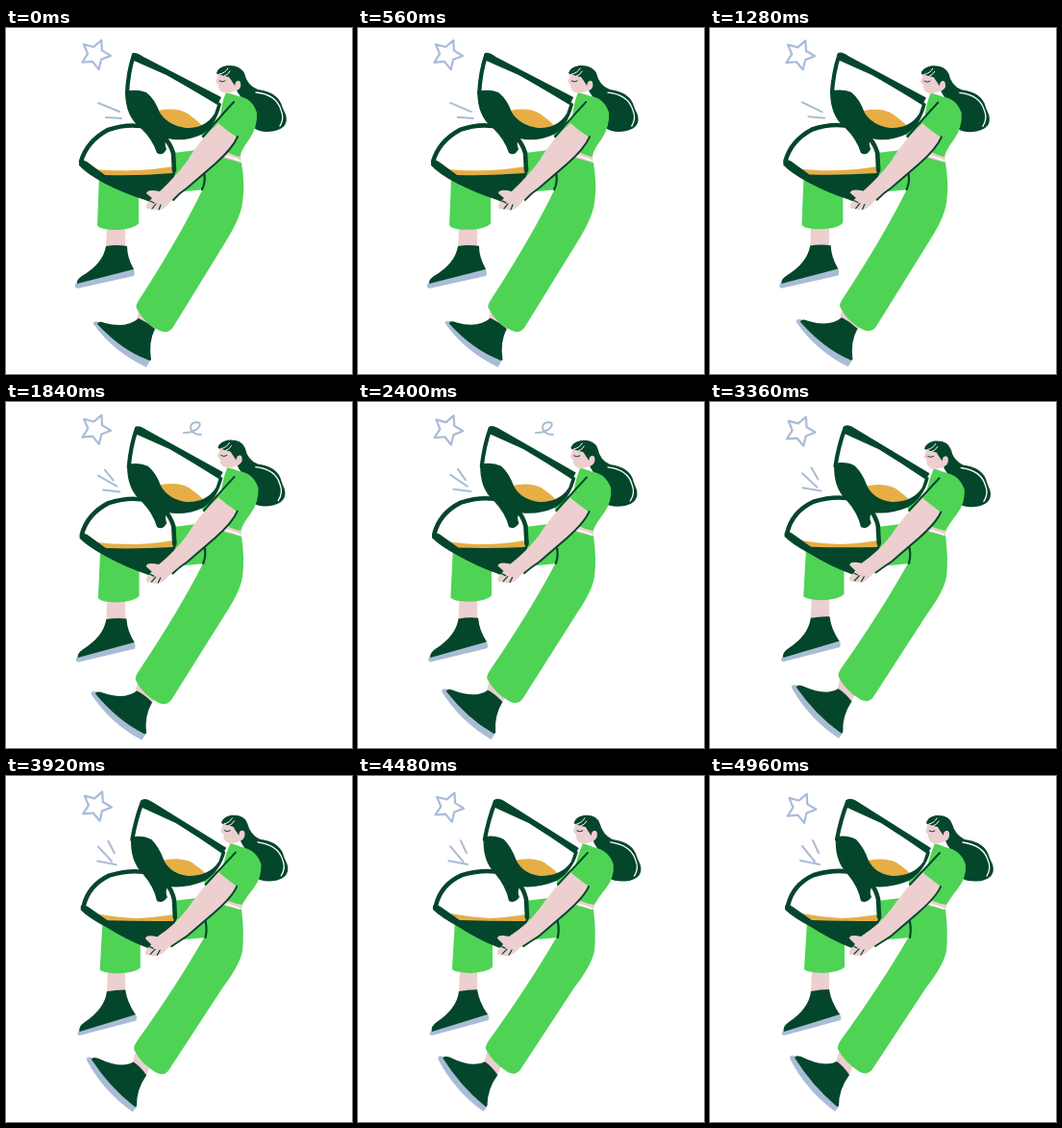
Recreate the animation shown at these times as an HTML page with a canvas. Size 360 by 360 pixels, loop 5.04 s.

```html
<!DOCTYPE html>
<html lang="en">
<head>
<meta charset="utf-8">
<title>Carrying the hourglass</title>
<style>
  html, body { margin: 0; width: 100%; height: 100%; overflow: hidden; background: #fff; }
  canvas { display: block; width: 100vmin; height: 100vmin; }
</style>
</head>
<body>
<canvas id="stage" width="360" height="360"></canvas>
<script>
const ctx = document.getElementById('stage').getContext('2d');
const LOOP = 5040, STEP = 80;
const GREEN = '#4fd355', DARK = '#04462c', SKIN = '#edcfd0', GOLD = '#e6ae44', BLUE = '#a9bcd6', WHITE = '#fff';

let ease = 0;
const mix = (a, b, k = ease) => a + (b - a) * k;

// "a>b" in path data is a coordinate that travels from a to b over the loop.
const shape = d => new Path2D(d.replace(/([\d.]+)>([\d.]+)/g, (_, a, b) => mix(+a, +b).toFixed(2)));

function fill(color, d) {
  ctx.fillStyle = color;
  ctx.fill(shape(d));
}

function line(color, width, d) {
  ctx.strokeStyle = color;
  ctx.lineWidth = width;
  ctx.stroke(shape(d));
}

function star(k) {
  const cx = mix(93, 94.5, k), cy = mix(27.5, 33.5, k);
  ctx.beginPath();
  for (let i = 0; i < 10; i++) {
    const r = i % 2 ? 8 : 16, a = i * Math.PI / 5 - 1.17;
    ctx.lineTo(cx + r * Math.cos(a), cy + r * Math.sin(a));
  }
  ctx.closePath();
  ctx.strokeStyle = BLUE;
  ctx.lineWidth = 2.2;
  ctx.stroke();
}

function accents(t) {
  star((t / LOOP) ** 2);
  line(BLUE, 2, 'M96>96 78>73 L118>109 87>89 M104>94 93>88 L120>114 94>92');
  if (t >= 1760) line(BLUE, 2, 'M101>107 72>67 L111>113 82>80');
  if (t >= 1840 && t < 2960) {
    line(BLUE, 2, 'M185 32 Q195 32 200 27 Q204 22 199 21 Q192 21 192 27 Q194 34 203 34');
  }
}

function backLeg() {
  fill(SKIN, 'M105>106 206>202 H124 V229>225 H104>105 Z');
  fill(BLUE, 'M73>76 265>265 L132>135 250>247 Q135>137 254>251 133>136 258>254 L74>77 271>270 Q70>73 270>269 73>76 265>265 Z');
  fill(DARK, 'M104>105 227>224 Q115 225>222 126>124 227>222 Q126>126 239>235 133>135 251>248 L74>77 266>266 Q73>75 262>261 79>82 258>256 Q101>103 245>242 104>105 227>224 Z');
  fill(GREEN, 'M97>101 153>151 Q130>134 134>132 174 130 L198 127 L230 140 L207>209 168 L176 171 L138>140 170 L138>140 203>199 Q134>135 209>204 115>117 210>205 Q97>100 210>204 95>98 205>201 Z');
}

function frontLeg() {
  fill(SKIN, 'M139>135 289>284 L160>149 303>300 L155>145 315>311 L136>131 303>298 Z');
  fill(BLUE, 'M91>83 306>292 Q95>86 304>289 99>90 307>293 Q118>109 332>326 150>134 346>344 L146>130 353>349 Q112>100 337>327 91>83 308>294 Z');
  fill(DARK, 'M138>132 302>297 Q147>139 306>302 155>145 313>311 Q148>134 327>326 151>134 345>343 Q150>133 347>345 147>131 345>343 Q120>106 335>322 95>88 308>293 Q96>89 304>290 103>95 307>292 Q125>119 313>304 138>132 302>297 Z');
  fill(GREEN, 'M226>227 134>134 L245 140>139 Q249>248 163 246>246 182 Q244>243 197 230>225 220 L174>169 311>305 Q169>164 319>312 160>156 315>308 Q144>140 308>298 136>133 292>284 Q134>132 289>281 139>136 282>275 Q181>178 217 205>207 167 L210 145 Z');
  line(DARK, 2.2, 'M205>207 148 Q209>210 158 204>208 168');
}

function lowerBulb() {
  fill(WHITE, 'M79>82 141>137 Q85>87 116>111 106>108 105>102 Q130>134 97>95 151>153 103>100 Q169>171 110>106 174>175 130>128 L176>177 148 L145 170 Z');
  fill(GOLD, 'M93>96 147>143 Q110>116 149>147 137 148 Q157 147 175>176 144 L172>174 154>151 L108>110 157>153 Z');
  fill(DARK, 'M76>78 140>135 Q78>80 136>132 84>86 139>136 L103>106 153>150 Q138 154>151 173>174 151 L177>178 144>142 Q177>178 156>155 167>168 168>167 L158 185>183 L145 179>178 Q125>125 173>170 103>105 162>157 Q83>86 151>147 76>78 143>139 Z');
  line(DARK, 4.6, 'M78>81 139>135 Q84>86 118>113 106>108 106>103 Q129>133 98>96 149>151 104>101 Q168>170 111>107 174>175 130>128 L175>176 148>147');
}

function upperBulb() {
  fill(WHITE, 'M135>145 28>27 L222>228 76>79 Q212>218 108>106 187>190 113>112 L126>132 68>66 Z');
  fill(GOLD, 'M158>163 86>88 Q177>181 82>84 189>194 89>90 Q199>203 96>96 207>211 104 L186>188 109 Q165>169 103 158>163 86>88 Z');
  fill(DARK, 'M124>131 66>63 Q136>144 63>61 146>152 67>66 Q155>160 74>74 160>165 88 Q168>172 101>102 187>190 104 Q207>212 105>104 217>222 89 L221>226 77 L224>229 79 Q218>224 103>98 203>207 111>109 Q186>187 119>117 168>169 115>115 Q164>165 119 167>168 126 Q163 134>133 157 130 Q152>154 115 140>143 104>102 Q124>129 92>88 124>131 66>63 Z');
  line(DARK, 4.2, 'M133>143 28>27 Q127>136 46>45 126>132 68>66');
  fill(DARK, 'M131>141 28>26 Q133>145 23>21 143>154 30>27 L224>230 72>75 L220>226 80>81 Q192>202 63>64 167>178 49 L133>143 34>33 Z');
}

function hair() {
  const sway = -10 * ease * (1 - ease);
  ctx.save();
  ctx.transform(1, 0, sway / 50, 1, -sway * 0.8, 0);
  fill(DARK, 'M219>225 47>49 Q220>226 41>43 230>235 39>41 Q243>249 38>40 248>252 47>50 Q251>255 60>61 262>265 64>66 Q280>283 66>68 286>289 78>80 Q288>291 84>86 291>294 90>92 Q295>298 103>105 280>283 107>109 Q266>269 110>111 258>261 104>106 Q263>265 93 255>259 82>84 Q244>248 74>77 239>244 63>65 Z');
  line(WHITE, 1.3, 'M260>263 67>69 Q281>284 69>72 286>289 85>87 Q290>293 94>96 285>288 102>104');
  ctx.restore();
}

function torso() {
  fill(SKIN, 'M227>229 126>128 L245>247 130>131 L244>245 140>139 Q235>237 137>137 226>228 135>135 Z');
  line(WHITE, 1.5, 'M228 133 Q236 135 243 138');
  fill(GREEN, 'M229>234 67>70 Q236>240 69>72 242>245 71>74 Q256>261 73>77 261>266 88>92 Q262>267 103>106 253>258 116>117 Q246>250 125>127 243>246 134 Q235 132 228 128 L207>210 116 Q201>205 112>113 204>208 106>107 L223>226 93>94 Q224>229 78>82 229>234 67>70 Z');
}

function face() {
  fill(SKIN, 'M221>227 46>48 Q221>226 51>53 218>224 56>58 L221>227 59>61 Q220>226 66>68 229>234 68>71 L237>242 66>69 Q246>250 64>67 244>249 57>59 Q243>247 53>55 239>244 56>58 L234>239 43>46 Z');
  fill(DARK, 'M219>225 47>49 Q224>229 38>40 234>239 40>42 Q246>250 43>46 244>249 55>57 Q239>243 53>55 238>243 60>62 Q235>239 55>57 232>237 51>53 Q226>231 50>52 219>225 47>49 Z');
  line(WHITE, 1, 'M222>228 48>50 Q228>233 47>49 231>236 42>44 M227>232 50>52 Q231>236 49>51 233>238 45>47');
  line(DARK, 1, 'M222>228 55>57 Q225>231 57>59 228>234 55>57');
}

function arm() {
  fill(SKIN, 'M222>222 98>99 Q230 107 241>240 112>114 Q238 125 217 142 L189 166 Q176 174 170>168 182>179 Q163>160 191>188 155>153 189>187 L147>146 188>186 Q144>143 185>183 149>148 180>178 L152>151 177>175 L146>145 172>169 Q147>145 167>164 160>157 170>167 Q177 154 188 139 Q202>204 115>116 222 98>99 Z');
  fill(GREEN, 'M237>240 77>80 Q225>228 87>89 221>222 99>101 Q231 108 241>240 114>115 L254>258 102>104 Z');
  line(DARK, 2, 'M237>239 77>80 Q223>227 92>93 205>208 113 M241>240 113>115 Q236 125 218 141 L189 166 Q180 172 174>172 179>177');
  line(DARK, 1.2, 'M150>149 180>177 L154>153 182>179 M152>150 188>185 L156>155 183>180 M159>157 189>186 L161>160 184>181');
}

function draw(now) {
  const t = Math.floor(now % LOOP / STEP) * STEP;
  ease = (1 - Math.cos(Math.PI * t / LOOP)) / 2;
  ctx.fillStyle = WHITE;
  ctx.fillRect(0, 0, 360, 360);
  ctx.lineCap = ctx.lineJoin = 'round';
  accents(t);
  backLeg();
  frontLeg();
  hair();
  torso();
  face();
  lowerBulb();
  upperBulb();
  arm();
}

const start = performance.now();
function tick() {
  draw(performance.now() - start);
  requestAnimationFrame(tick);
}
tick();
</script>
</body>
</html>
```
